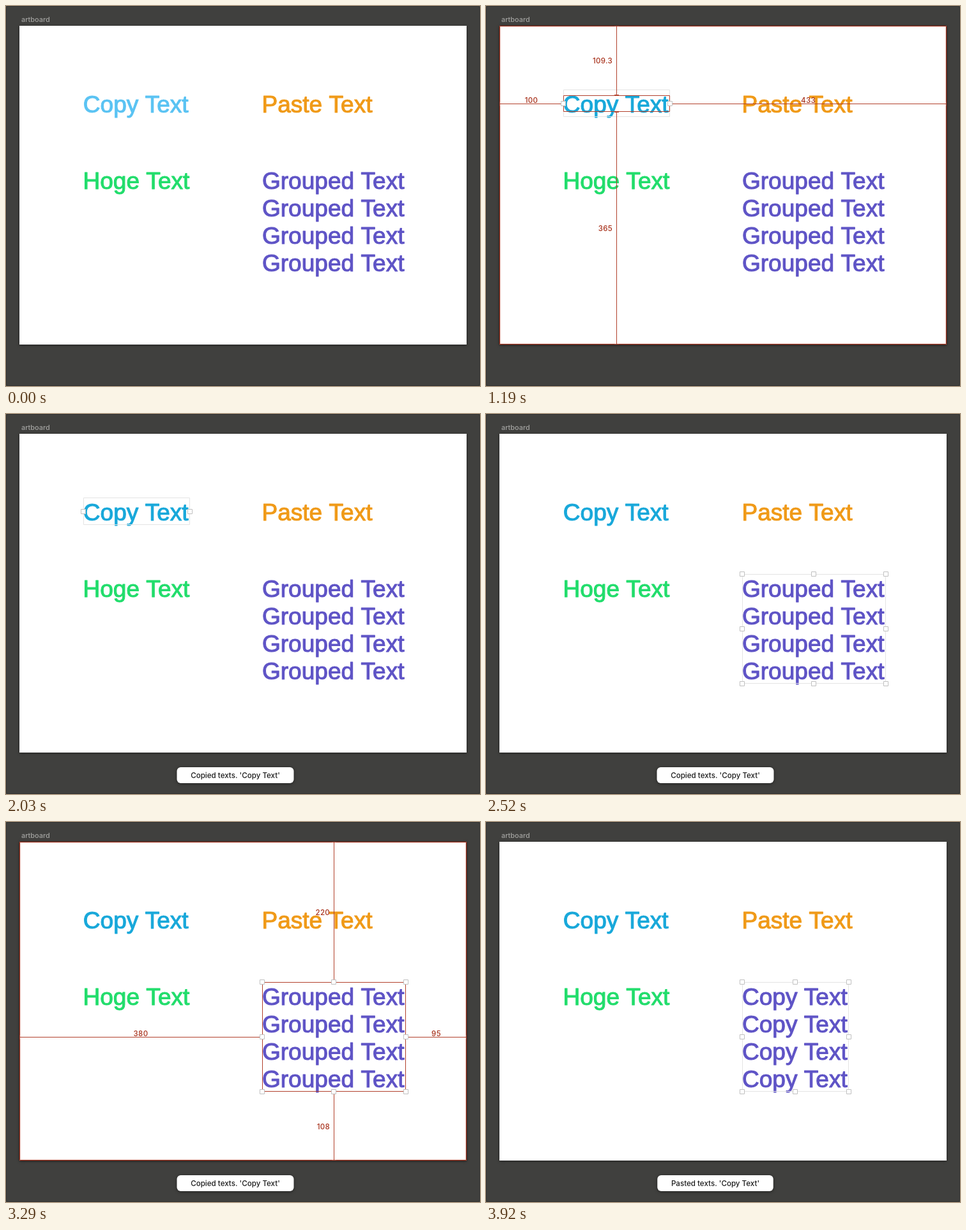
An HTML page with a canvas for the animation above (3990 ms loop, 742 px wide and 596 px high).

```html
<!DOCTYPE html>
<html lang="en">
<head>
<meta charset="utf-8">
<title>Copy and paste text</title>
<style>
  html, body { margin: 0; width: 100%; height: 100%; overflow: hidden; background: #40403e; }
  canvas { display: block; }
</style>
</head>
<body>
<canvas width="742" height="596"></canvas>
<script>
const ctx = document.querySelector('canvas').getContext('2d');
const LOOP = 3990, STEP = 70;
const UI = 'Inter, Roboto, sans-serif';
const RED = '#a8321c', RULE = '#b2402c';
const BOARD = { l: 21, t: 31, r: 721, b: 531 };

// Moments in ms
const SELECT_COPY = 910, MEASURE_COPY = 1120, COPY = 1540, COPY_DONE = 1890,
      SELECT_GROUP = 2240, MEASURE_GROUP = 2870, PASTE = 3500, PASTE_DONE = 3780;

function fill(color, x, y, w, h) {
  ctx.fillStyle = color;
  ctx.fillRect(x, y, w, h);
}

function frame(color, { l, t, r, b }) {
  ctx.strokeStyle = color;
  ctx.lineWidth = 1;
  ctx.strokeRect(l + .5, t + .5, r - l - 1, b - t - 1);
}

function label(str, x, y, size, color, align = 'left', spacing = 0) {
  ctx.font = `500 ${size}px ${UI}`;
  ctx.letterSpacing = spacing + 'px';
  ctx.textAlign = align;
  ctx.fillStyle = color;
  ctx.fillText(str, x, y);
}

// A thin outline gives the headline its medium weight
function headline(str, x, y, color) {
  ctx.font = '37.1px "Liberation Sans", Arial, sans-serif';
  ctx.letterSpacing = '0px';
  ctx.textAlign = 'left';
  ctx.fillStyle = ctx.strokeStyle = color;
  ctx.lineWidth = 1.1;
  ctx.lineJoin = 'round';
  ctx.fillText(str, x, y);
  ctx.strokeText(str, x, y);
}

function withShadow(color, blur, dy, draw) {
  ctx.save();
  ctx.shadowColor = color;
  ctx.shadowBlur = blur;
  ctx.shadowOffsetY = dy;
  draw();
  ctx.restore();
}

function handle(x, y) {
  const box = { l: Math.floor(x) - 4, t: Math.floor(y) - 4 };
  fill('#fff', box.l, box.t, 8, 8);
  frame('#c0c0c0', { ...box, r: box.l + 8, b: box.t + 8 });
}

// Distances from a box to the artboard edges
function measure(box, [left, top, right, bottom]) {
  const { l, t, r, b } = box;
  const cx = Math.floor((l + r) / 2), cy = Math.floor((t + b) / 2);
  const across = (x1, x2, str) => {
    fill(RULE, x1, cy, x2 - x1, 1);
    for (const x of [x1, x2 - 1]) fill(RULE, x, cy - 3, 1, 7);
    label(str, (x1 + x2) / 2, cy - 1.5, 11.5, RED, 'center', .3);
  };
  const down = (y1, y2, str) => {
    fill(RULE, cx, y1, 1, y2 - y1);
    for (const y of [y1, y2 - 1]) fill(RULE, cx - 3, y, 7, 1);
    label(str, cx - 6, (y1 + y2) / 2 + 4.5, 11.5, RED, 'right', .3);
  };
  withShadow('rgba(110,25,10,.6)', 2, 0, () => frame('#a02c18', BOARD));
  frame(RULE, box);
  across(BOARD.l, l, left);
  across(r, BOARD.r, right);
  down(BOARD.t, t, top);
  down(b, BOARD.b, bottom);
}

function toast(str, w, alpha) {
  ctx.globalAlpha = alpha;
  withShadow('rgba(0,0,0,.5)', 5, 1, () => {
    ctx.fillStyle = '#fff';
    ctx.beginPath();
    ctx.roundRect(359 - w / 2, 554, w, 25, 6);
    ctx.fill();
  });
  label(str, 359, 571, 11.6, '#1c1c1c', 'center');
  ctx.globalAlpha = 1;
}

function draw(t) {
  const between = (a, b) => t >= a && t < b;
  const pasted = t >= PASTE;

  fill('#40403e', 0, 0, 742, 596);
  ctx.strokeStyle = '#30302f';
  ctx.lineWidth = 1;
  ctx.beginPath();
  ctx.roundRect(.5, .5, 741, 595, 3);
  ctx.stroke();
  label('artboard', 24, 25, 10.9, '#a3a3a1');
  withShadow('rgba(0,0,0,.55)', 4, 1, () => fill('#fff', 21, 31, 700, 500));

  headline('Copy Text', 120.8, 166.5, t < SELECT_COPY ? '#5ac3f3' : '#18a8da');
  headline('Paste Text', 400.4, 166.5, '#f09a18');
  headline('Hoge Text', 120.4, 286.7, '#22dd6c');
  for (let i = 0; i < 4; i++)
    headline(pasted ? 'Copy Text' : 'Grouped Text', 400.9, 286.5 + 43 * i, '#5f54c6');

  if (between(SELECT_COPY, SELECT_GROUP)) {
    frame('#e4e4e4', { l: 121, t: 131, r: 288, b: 174 });
    if (between(MEASURE_COPY, COPY_DONE))
      measure({ l: 121, t: 140, r: 288, b: 166 }, ['100', '109.3', '433', '365']);
    for (const x of [121, 288]) handle(x, 153);
  }

  if (t >= SELECT_GROUP) {
    const box = { l: 401, t: 251, r: pasted ? 568 : 626, b: 423 };
    frame('#e4e4e4', box);
    if (between(MEASURE_GROUP, PASTE_DONE))
      measure(box, ['380', '220', pasted ? '153' : '95', '108']);
    const mid = (box.l + box.r) / 2;
    for (const x of [box.l, mid, box.r])
      for (const y of [251, 337, 423])
        if (x !== mid || y !== 337) handle(x, y);
  }

  if (pasted) toast("Pasted texts. 'Copy Text'", 181.5, 1);
  else if (t >= COPY) toast("Copied texts. 'Copy Text'", 183, Math.min(1, (t - COPY + STEP) / 210));
}

const start = performance.now();
function tick() {
  const t = (performance.now() - start) % LOOP;
  draw(Math.floor(t / STEP) * STEP);
  requestAnimationFrame(tick);
}
tick();
</script>
</body>
</html>
```
